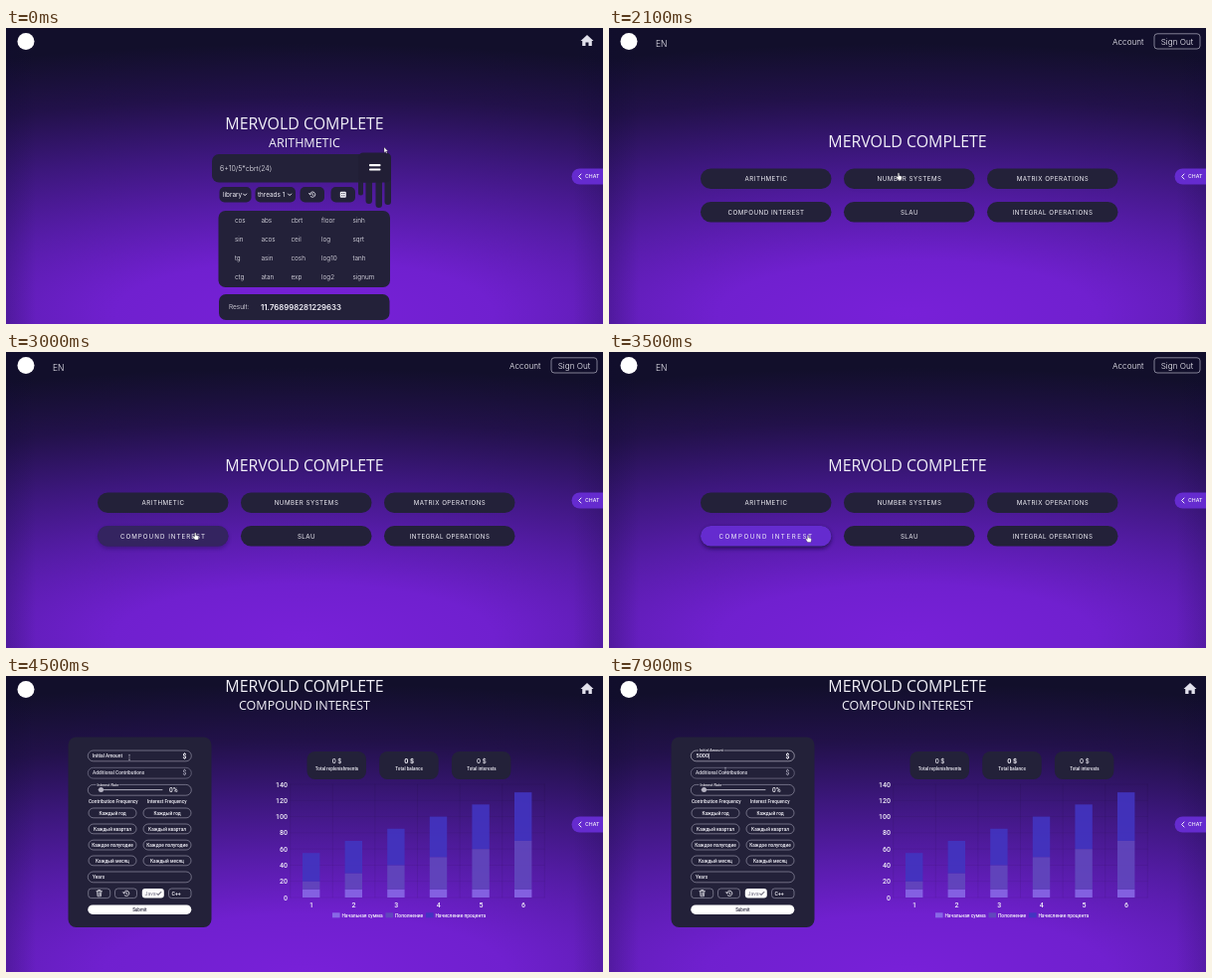
Write an HTML page that moves like this. It is 600 px wide and 298 px high and loops after 8000 ms.

```html
<!DOCTYPE html>
<html lang="en">
<head>
<meta charset="utf-8">
<title>Math tools</title>
<style>
html, body { margin: 0; width: 100%; height: 100%; overflow: hidden; background: #120f2b; }
svg { display: block; width: 600px; height: 298px; font-family: Inter, Roboto, sans-serif; fill: #f3f2f9; }
.head { font-family: "Open Sans", sans-serif; text-anchor: middle; }
.form, .chart { font-family: Roboto, sans-serif; font-weight: 500; }
</style>
</head>
<body>
<svg id="stage" viewBox="0 0 600 298"></svg>
<script>
const DARK = '#232139', LIGHT = '#f3f2f9', VIOLET = '#652bcf';
const stage = document.getElementById('stage');
const el = id => document.getElementById(id);

// Markup helpers
const box = (x, y, w, h, r, fill = DARK, extra = '') =>
  `<rect x="${x}" y="${y}" width="${w}" height="${h}" rx="${r}" fill="${fill}" ${extra}/>`;
const outline = (x, y, w, h, r = 5, color = '#a3a1b5', extra = '') =>
  box(x, y, w, h, r, 'none', `stroke="${color}" stroke-width=".6" ${extra}`);
const text = (s, x, y, size, extra = '') => `<text x="${x}" y="${y}" font-size="${size}" ${extra}>${s}</text>`;
const mid = (s, x, y, size, extra = '') => text(s, x, y, size, 'text-anchor="middle" ' + extra);
const line = (d, width = 1, color = LIGHT) =>
  `<path d="${d}" fill="none" stroke="${color}" stroke-width="${width}" stroke-linecap="round" stroke-linejoin="round"/>`;
const grid = (cols, rows, draw) => rows.map((y, j) => cols.map((x, i) => draw(x, y, i, j)).join('')).join('');
const heading = (y, sub) => `<g class="head">${text('MERVOLD COMPLETE', 300, y, 15.9, 'font-weight="500"')}` +
  (sub ? text(sub, 300, y + 18, 12.5) : '') + '</g>';

const backdrop = (id, cy, ry) => {
  const colors = ['#7820d8', '#7020cf', '#561ca8', '#3c177c', '#22114a', '#120f2b'];
  const stops = colors.map((c, i) => `<stop offset="${i / 5}" stop-color="${c}"/>`).join('');
  return `<radialGradient id="${id}" gradientUnits="userSpaceOnUse" r="1" cx="0" cy="0"
    gradientTransform="translate(300 ${cy}) scale(${ry * 3.5} ${ry})">${stops}</radialGradient>
    ${box(0, 0, 600, 298, 0, `url(#${id})`)}${box(0, 0, 600, 298, 0, 'url(#edge)')}`;
};

const home = `<path d="M577.5 13 584 7l6.5 6h-1.7v5h-3.3v-3.6h-3v3.6h-3.3v-5z" fill="#e2e1ec"/>`;
const history = (x, y) => line(`M${x - 2.6} ${y - .4}a2.7 2.7 0 1 1 .8 2.3M${x - 3.5} ${y - 1.2}l1 1.2 1.2-.9M${x} ${y - 1.2}v1.4l1 .6`, .8);

const frameParts = `
  <circle cx="20" cy="13.5" r="8.5" fill="#fff"/>
  <path d="M600 141.5H576.5a8 8 0 0 0-8 8 8 8 0 0 0 8 8H600z" fill="${VIOLET}"/>
  ${line('M578 147l-2.4 2.5 2.4 2.5', 1)}
  ${text('CHAT', 582, 151.4, 5.2, 'font-weight="500"')}`;

function calculator() {
  const names = [['cos', 'abs', 'cbrt', 'floor', 'sinh'], ['sin', 'acos', 'ceil', 'log', 'sqrt'],
    ['tg', 'asin', 'cosh', 'log10', 'tanh'], ['ctg', 'atan', 'exp', 'log2', 'signum']];
  const arrow = x => line(`M${x} 167l1.6 1.6 1.6-1.6`, 1);
  const drips = [[354, 168.5, 5], [361.5, 177, 6.5], [371.5, 181, 6.5], [380.5, 178, 6.5]]
    .map(([x, end, w]) => box(x, 145, w, end - 145, w / 2)).join('');
  return backdrop('bgA', 288, 272) + home + heading(101.5, 'ARITHMETIC') +
    box(207, 127, 170, 28.5, 7) + drips + box(354, 125.5, 33, 30, 5, '#211e35') +
    box(365, 137, 11.5, 2.2, .8, '#fff') + box(365, 141.4, 11.5, 2.2, .8, '#fff') +
    text('6+10/5*cbrt(24)', 215, 144, 7, 'font-weight="300"') +
    box(214.5, 160, 32, 15.5, 5) + box(250.5, 160, 40.5, 15.5, 5) +
    box(295.5, 160, 24.5, 15.5, 5) + box(326.5, 160, 24.5, 15.5, 5) +
    text('library', 218, 170, 6.4) + arrow(238.5) + text('threads 1', 253, 170, 6.4) + arrow(283.5) +
    history(308, 167.7) + box(335.8, 164.7, 6, 6, 1, LIGHT) +
    grid([337.2, 339.3], [166, 168.2], (x, y) => box(x, y, 1.1, 1.1, .2)) +
    box(213.5, 184, 172.5, 77, 7) +
    grid([230, 256.5, 286.5, 317, 348.5], [195.8, 214.8, 234, 253], (x, y, i, j) => text(names[j][i], x, y, 6.4, 'font-weight="300"')) +
    box(214, 268, 171.5, 26, 7) + text('Result:', 224, 283.3, 6.5, 'font-weight="300"') +
    text('11.768998281229633', 256, 284, 7.8, 'font-weight="600"');
}

const menuNames = ['ARITHMETIC', 'NUMBER SYSTEMS', 'MATRIX OPERATIONS', 'COMPOUND INTEREST', 'SLAU', 'INTEGRAL OPERATIONS'];
function menu() {
  return backdrop('bgB', 288, 272) + text('EN', 47, 18.6, 8.4, 'font-weight="300"') +
    text('Account', 506, 16.8, 8.2, 'font-weight="300"') + outline(548, 5.8, 46, 15.2, 3, '#cfcddc') +
    mid('Sign Out', 571, 16.6, 8.2, 'font-weight="300"') + heading(120) +
    grid([92, 236, 380], [141.5, 175], (x, y, i, j) => {
      const n = i + j * 3;
      return box(x + 1, y + 2, 130, 20.5, 10.2, '#120a36', `id="shade${n}" opacity="0" filter="url(#soft)"`) +
        box(x, y, 131.5, 20.5, 10.2) + box(x, y, 131.5, 20.5, 10.2, VIOLET, `id="glow${n}" opacity="0"`) +
        mid(menuNames[n], x + 66, y + 12.6, 6.2, `id="name${n}" letter-spacing=".5"`);
    });
}

const shades = ['#8868e6', '#6148bd', '#4235c0'];
const scale = 114 / 140;
function chart() {
  let s = '';
  for (let v = 0; v <= 140; v += 20) {
    const y = 223 - v * scale;
    s += line(`M285.7 ${y}H541.3`, .5, '#0002') + text(v, 283, y + 2.5, 7, 'text-anchor="end"');
  }
  for (let i = 0; i < 7; i++) s += line(`M${285.7 + i * 42.6} 109V223`, .5, '#0002');
  for (let i = 0; i < 6; i++) {
    s += mid(i + 1, 307 + i * 42.6, 233, 7);
    for (let k = 0; k < 3; k++) s += box(298 + i * 42.6, 223, 17.4, 0, 0, shades[k], `id="bar${i}${k}" opacity=".9"`);
  }
  [['Начальная сумма', 328], ['Пополнение', 381.5], ['Начисление процента', 422]]
    .forEach(([label, x], k) => s += box(x, 238.3, 7.6, 5, 0, shades[k]) + text(label, x + 9.4, 242.6, 4.9));
  return `<g class="chart">${s}</g>`;
}

function interest() {
  const periods = ['Каждый год', 'Каждый квартал', 'Каждое полугодие', 'Каждый месяц'];
  const cards = ['replenishments', 'balance', 'interests'].map((name, i) => {
    const x = 302.5 + i * 72.7;
    return box(x, 76, 59.5, 28, 8) + mid('0 $', x + 30, 87.6, 6.2, `font-weight="${i === 1 ? 700 : 500}"`) +
      mid('Total ' + name, x + 30, 95, 4.3, 'font-weight="600"');
  }).join('');
  const form = box(62.5, 61.5, 144, 191.5, 8) +
    outline(82.3, 75, 104, 10.8, 5.4, '#a3a1b5', 'id="field"') + box(90, 73.5, 25.5, 3, 0, DARK, 'id="gap"') +
    text('Initial Amount', 87, 82, 4.8, 'id="label"') + text('', 87.5, 82.4, 5.6, 'id="entry"') +
    text('$', 177.5, 82.8, 6.8, 'font-weight="600"') +
    outline(82.3, 92.3, 104, 10.8, 5.4, '#85839a') + text('Additional Contributions', 87, 99.3, 4.8, 'fill="#dddce6"') +
    text('$', 177.5, 100, 6.8, 'fill="#a3a1b5"') +
    outline(82.3, 109.4, 104, 10.8, 5.4) + box(90.5, 108, 23, 3, 0) + text('Interest Rate', 91.5, 110.6, 3.8) +
    line('M93 114.6H157', .8, '#d5d3e0') + '<circle cx="95.5" cy="114.6" r="2.5" fill="#b5b3c2"/>' + text('0%', 164, 116.9, 6.6) +
    text('Contribution Frequency', 83, 128.2, 4.75) + text('Interest Frequency', 142, 128.2, 4.75) +
    grid([83, 138], [133, 149, 165.2, 181], (x, y, i, j) =>
      outline(x, y, 48, 9.8, 4.9) + mid(periods[j], x + 24, y + 6.5, 4.7)) +
    outline(82.3, 197, 104, 10.8, 5.4) + text('Years', 87, 204, 4.8) +
    outline(82.7, 214, 22, 9.6, 3) + line('M91 216.6h5.4M92.6 216v-.5h2.2v.5M91.6 217l.4 4.8h3.4l.4-4.8M93 218v2.6M94.4 218v2.6', .7) +
    outline(109.5, 214, 22, 9.6, 3) + history(121, 218.9) +
    box(136.8, 214, 22, 9.6, 3, '#fff') + text('Java', 139.5, 220.8, 5.2, 'fill="#8b899a"') + line('M151.6 219l1.4 1.5 2.8-3', 1, '#333147') +
    outline(163.5, 214, 22.5, 9.6, 3) + text('C++', 166.5, 220.6, 5.2) +
    box(82.3, 230.4, 104, 9.6, 4.8, '#fff') + mid('Submit', 134.3, 236.7, 4.5, 'fill="#29273d"') +
    box(88, 77.8, .6, 5.6, 0, LIGHT, 'id="caret"');
  return backdrop('bgC', 298, 290) + home + heading(15.8, 'COMPOUND INTEREST') + `<g class="form">${form}</g>` + cards + chart();
}

stage.innerHTML = `<defs>
  <filter id="soft" x="-20%" y="-60%" width="140%" height="240%"><feGaussianBlur stdDeviation="2"/></filter>
  <linearGradient id="edge">
    <stop offset="0" stop-color="#0c0830" stop-opacity=".2"/><stop offset=".05" stop-color="#0c0830" stop-opacity="0"/>
    <stop offset=".95" stop-color="#0c0830" stop-opacity="0"/><stop offset="1" stop-color="#0c0830" stop-opacity=".15"/>
  </linearGradient></defs>
  <g id="scene0">${calculator()}</g><g id="scene1">${menu()}</g><g id="scene2">${interest()}</g>${frameParts}
  <g id="cursor">
    <path id="arrow" d="M0 0v5.4l1.3-1.1.9 1.9.9-.4-.8-1.8h1.6z" fill="#fff" stroke="#222" stroke-width=".3"/>
    <path id="hand" d="M-.7 .3Q0-.6.7 .3V2.6l2.2.6q.7.3.5 1.2L2.9 7h-3.2L-2.3 4.3q-.2-1 .7-.8l.9.6z" fill="#fff" stroke="#222" stroke-width=".3"/>
    <path id="beam" d="M-1-2.6h2M0-2.6v5.2M-1 2.6h2" fill="none" stroke="#b5b4c4" stroke-width=".5"/>
  </g>`;

// Motion
const LOOP = 8000;
const clamp = v => Math.min(1, Math.max(0, v));
const smooth = v => v * v * (3 - 2 * v);
const path = [[0, 380, 120], [800, 583, 13], [1150, 583, 13], [1900, 325, 127], [2100, 291, 146], [2350, 272, 153],
  [2600, 223, 169], [2950, 190, 182], [3500, 200, 184.5], [3700, 200, 184.5], [4450, 124, 82], [5500, 124, 82],
  [5950, 142, 84], [7150, 142, 84], [7850, 117, 95], [LOOP, 117, 95]];
const keys = [6200, 6700, 7050, 7450];
const FOCUS = 4980;

function pointer(t) {
  const i = path.findIndex(p => p[0] > t), [t0, x0, y0] = path[i - 1], [t1, x1, y1] = path[i];
  const k = smooth((t - t0) / (t1 - t0));
  return [x0 + (x1 - x0) * k, y0 + (y1 - y0) * k];
}
const set = (id, attrs) => { for (const a in attrs) el(id).setAttribute(a, attrs[a]); };
const show = (id, on) => set(id, { visibility: on ? 'visible' : 'hidden' });

function hover(n, k) {
  set('glow' + n, { opacity: k * k });
  set('shade' + n, { opacity: k * .8 });
  set('name' + n, { 'letter-spacing': .5 + k * 1.05 });
}

function draw(t) {
  const scene = t < 1100 ? 0 : t < 3600 ? 1 : 2;
  for (let i = 0; i < 3; i++) set('scene' + i, { display: i === scene ? 'inline' : 'none' });

  hover(1, smooth(clamp((t - 2080) / 300)) * (1 - smooth(clamp((t - 2430) / 300))));
  hover(3, smooth(clamp((t - 2850) / 300)));

  const grow = 1 - (1 - clamp((t - 3600) / 900)) ** 4;
  for (let i = 0; i < 6; i++) {
    const levels = [0, 10, 20 + i * 10, 55 + i * 15].map(v => v * scale * grow);
    for (let k = 0; k < 3; k++) set(`bar${i}${k}`, { y: 223 - levels[k + 1], height: levels[k + 1] - levels[k] });
  }

  const lift = smooth(clamp((t - FOCUS) / 120));
  set('label', { x: 87 + 4 * lift, y: 82 - 6.4 * lift, 'font-size': 4.8 - lift });
  set('gap', { opacity: lift });
  set('field', { stroke: t < FOCUS ? '#a3a1b5' : '#cfcdda' });
  const typed = keys.filter(k => k <= t);
  el('entry').textContent = '5000'.slice(0, typed.length);
  const since = t - (typed.length ? typed[typed.length - 1] : FOCUS);
  set('caret', { x: 87.8 + typed.length * 3.15, opacity: since >= 0 && since % 1000 < 500 ? 1 : 0 });

  const [x, y] = pointer(t);
  set('cursor', { transform: `translate(${x} ${y})` });
  const beam = scene === 2 && x > 82 && x < 187 && y > 74 && y < 104;
  const hand = !beam && (x > 577 && y < 19 && scene === 0 ||
    scene === 1 && (y > 141 && y < 162 && x > 236 && x < 367 || y > 175 && x < 223));
  show('beam', beam);
  show('hand', hand);
  show('arrow', !beam && !hand);
}

const start = performance.now();
function tick() {
  draw((performance.now() - start) % LOOP);
  requestAnimationFrame(tick);
}
tick();
</script>
</body>
</html>
```
